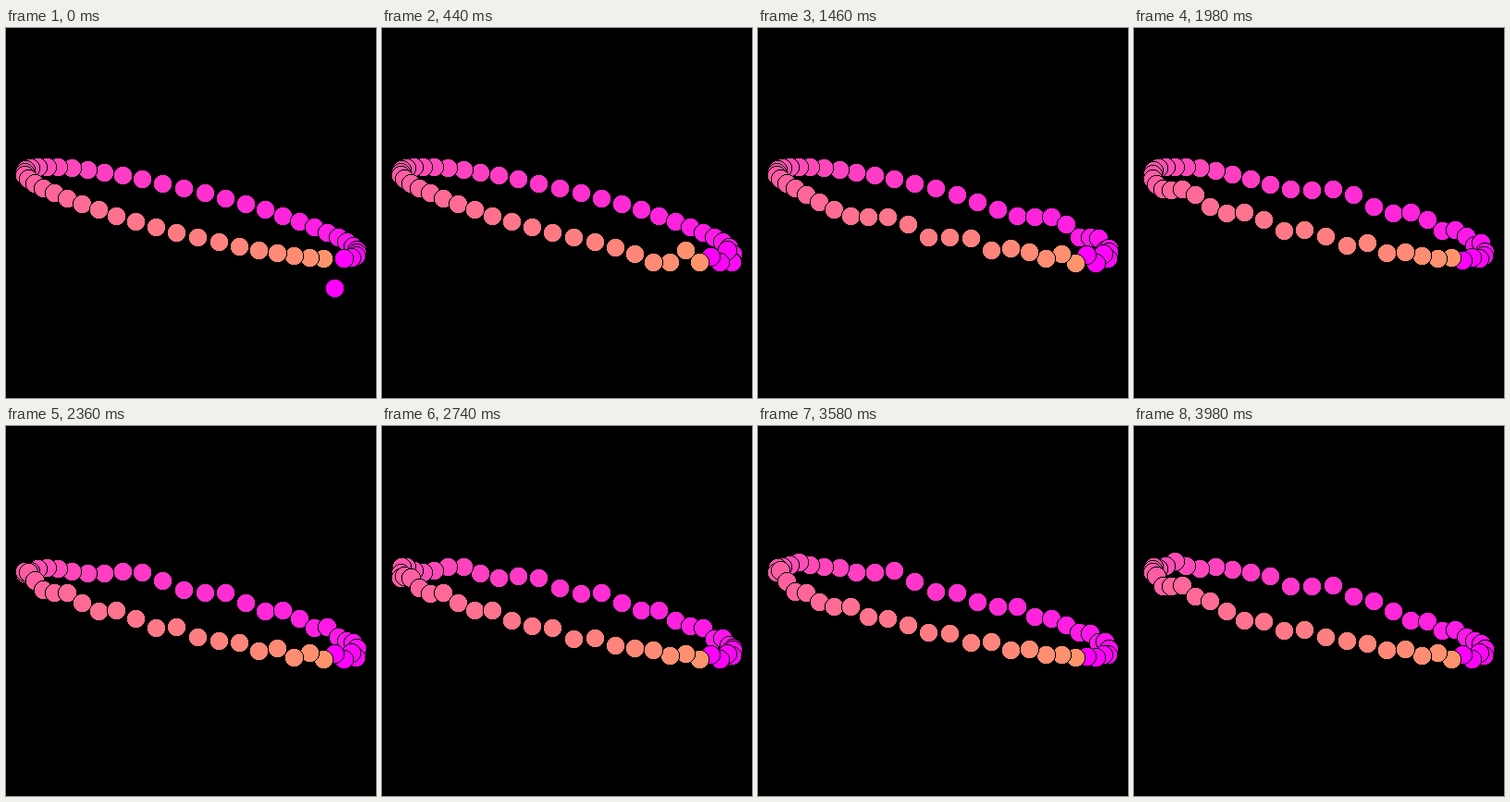
Write an HTML page with a canvas that moves like this. It is 400 by 400 pixels and loops after 4 s.

```html
<!DOCTYPE html>
<html lang="en">
<head>
<meta charset="utf-8">
<title>Wave on a ring of beads</title>
<style>
  html, body { margin: 0; width: 100%; height: 100%; overflow: hidden; background: #000; }
  canvas { display: block; }
</style>
</head>
<body>
<canvas id="stage" width="400" height="400"></canvas>
<script>
  const ctx = document.getElementById('stage').getContext('2d');
  const COUNT = 50, STEP = 20, STEPS = 200;
  const TAU = 2 * Math.PI;
  const PLUCK = 32;    // starting offset of bead 0
  const RATE = 0.4;    // highest frequency of the chain, per step
  const LEAD = 0.25;   // steps already passed at the start

  const beads = Array.from({ length: COUNT }, (_, i) => {
    const turn = TAU * i / COUNT;
    const angle = Math.PI / 6 - turn;
    return {
      i,
      x: 200 + 180 * Math.cos(angle),
      y: 200 + 50 * Math.cos(turn),
      depth: Math.sin(angle),
      color: `rgb(255, ${3 * i}, ${255 - 3 * i})`
    };
  }).sort((a, b) => a.depth - b.depth);

  // Sum of the normal modes of a closed chain of springs
  function offset(i, time) {
    let sum = 0;
    for (let m = 0; m < COUNT; m++) {
      sum += Math.cos(TAU * m * i / COUNT) *
             Math.cos(RATE * Math.sin(Math.PI * m / COUNT) * time);
    }
    return PLUCK * sum / COUNT;
  }

  // Disc with hard pixel edges
  function disc(x, y, radius, color) {
    ctx.fillStyle = color;
    const reach = Math.floor(radius);
    for (let dy = -reach; dy <= reach; dy++) {
      const half = Math.floor(Math.sqrt(radius * radius - dy * dy));
      ctx.fillRect(x - half, y + dy, 2 * half + 1, 1);
    }
  }

  function draw(step) {
    ctx.fillStyle = '#000';
    ctx.fillRect(0, 0, 400, 400);
    for (const bead of beads) {
      const x = Math.floor(bead.x);
      const y = Math.floor(bead.y + offset(bead.i, step + LEAD));
      disc(x, y, 10.5, '#000');
      disc(x, y, 9.5, bead.color);
    }
  }

  const start = performance.now();
  function tick() {
    draw(Math.floor((performance.now() - start) / STEP) % STEPS);
    requestAnimationFrame(tick);
  }
  tick();
</script>
</body>
</html>
```
